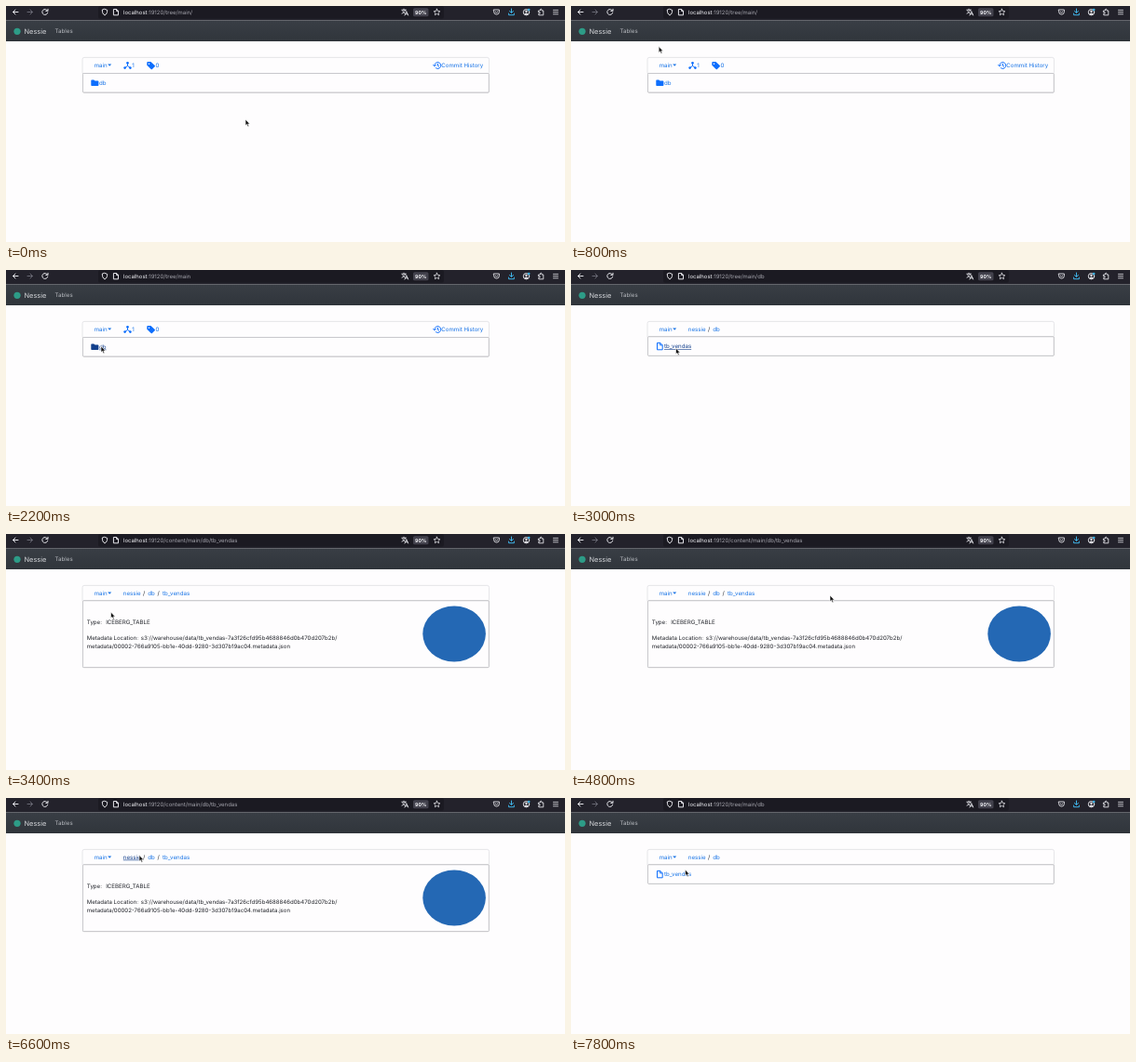
These frames come from a looping animation (600x254 px, 8 s). An HTML page:

```html
<!DOCTYPE html>
<html lang="en">
<head>
<meta charset="utf-8">
<style>
  html, body { margin: 0; width: 100%; height: 100%; overflow: hidden; background: #fefdfe; }
  svg { display: block; width: 600px; height: 254px; }
  text { font: 6.17px Inter, sans-serif; fill: #202329; text-rendering: geometricPrecision; white-space: pre; }
  .location { font-size: 6.08px; }
  .link { fill: #1673e6; }
  .hover { fill: #123f8c; text-decoration: underline; }
  .folder { fill: #0d6efd; }
  .folder.hover { fill: #123f8c; }
  .line { fill: none; stroke: #e4e4e9; stroke-width: 1; stroke-linecap: round; stroke-linejoin: round; }
  .dim { stroke: #696974; }
  .blue { stroke: #3fb4e8; }
  .icon { fill: none; stroke: #0d6efd; stroke-width: 1; }
  .box { fill: #fefdfe; stroke: #e0e0e4; stroke-width: .8; }
  .panel { fill: #fefdfe; stroke: #c8c8cc; stroke-width: 1; filter: drop-shadow(0 .4px .6px #0004); }
</style>
</head>
<body>
<svg viewBox="0 0 600 254">
  <defs>
    <linearGradient id="dark" x2="0" y2="1">
      <stop stop-color="#393e45"/><stop offset="1" stop-color="#30353b"/>
    </linearGradient>
  </defs>
  <rect width="600" height="254" fill="#fefdfe"/>

  <g id="browser">
    <rect width="600" height="15.5" fill="#23222b"/>
    <rect x="99" y="0" width="371" height="13.5" rx="2" fill="#1b1a22"/>
    <path class="line" d="M13 6.5H7.5M10 4L7.5 6.5L10 9"/>
    <path class="line dim" d="M23 6.5h5.5M26 4l2.5 2.5L26 9"/>
    <path id="reload" class="line" d="M44.5 5A3 3 0 1 0 44.8 7.2M45 3.3V5.4H42.8"/>
    <path id="stop" class="line" d="M39.7 4.3l4.6 4.6m0-4.6l-4.6 4.6"/>
    <path class="line" d="M106 3.4l2.7 1c0 3-.8 4.5-2.7 5.6c-1.9-1.1-2.7-2.6-2.7-5.6z"/>
    <path class="line" d="M115.8 3.5h3l1.7 1.8v4.5h-4.7zM118.6 3.7v1.8h1.8"/>
    <text x="126" y="9" style="font-size:5.98px;fill:#a5a5ad"><tspan fill="#f6f6fa">localhost</tspan><tspan id="path"></tspan></text>
    <path id="translate" class="line" style="stroke-width:.9" d="M424.8 4.2h4.6M427 3.2v1M428.6 4.3c-.5 1.8-1.7 3-3.6 3.8M425.7 5.2c.5 1.2 1.2 2 2.2 2.6M428 10l1.8-4.3L431.6 10M428.7 8.7h2.3"/>
    <rect x="437" y="2.3" width="16.5" height="9" rx="1.6" fill="#43424d"/>
    <text x="445.3" y="8.8" text-anchor="middle" style="font-size:5.3px;font-weight:700;fill:#f8f8fb">90%</text>
    <path class="line" d="M462.5 3.2l1 2.2 2.4.3-1.8 1.6.5 2.4-2.1-1.2-2.1 1.2.5-2.4-1.8-1.6 2.4-.3z" style="stroke-width:.8"/>
    <path class="line" d="M523.6 4h5.8v2.2a2.9 2.9 0 0 1-5.8 0zM525.1 5.9l1.4 1.3 1.4-1.3" style="stroke-width:.9"/>
    <path class="line blue" d="M542.5 3v4.2m-2-1.8l2 2 2-2M539.6 8v1.7h5.8V8"/>
    <circle class="line" cx="558.5" cy="6.7" r="3.2"/>
    <circle cx="558.5" cy="5.8" r="1.2" fill="#e4e4e9"/>
    <path d="M556.4 8.7q2.1-2.4 4.2 0l-2.1 1z" fill="#e4e4e9"/>
    <circle cx="561.2" cy="4" r="1.3" fill="#3fb4e8"/>
    <path class="line" d="M571.8 5h1.6q-.4-1.8.8-1.8T575 5h1.8v4.8h-5V8q1.6.2 1.6-.7t-1.6-.7z" style="stroke-width:.9"/>
    <path class="line" d="M587.5 4.4h5m-5 2.2h5m-5 2.2h5" style="stroke-width:.8"/>
  </g>

  <g id="page">
    <rect y="15.5" width="600" height="22.5" fill="url(#dark)"/>
    <circle cx="12" cy="27.3" r="3.6" fill="#2d9c87"/>
    <text x="19.5" y="29.7" style="font-size:7.4px;fill:#d4d6d9">Nessie</text>
    <text id="tables" x="52.6" y="29.2">Tables</text>
    <rect class="box" x="82" y="55.4" width="436.5" height="18" rx="2"/>
    <text class="link" x="94.7" y="65.6">main</text>
    <path d="M109.2 62.6h4l-2 2.1z" fill="#1673e6"/>

    <g id="tree">
      <path class="icon" d="M130.5 61.5v3l-2.8 2m2.8-2l2.8 2"/>
      <g class="folder">
        <circle cx="130.5" cy="61.3" r="1.3"/><circle cx="127.6" cy="66.6" r="1.3"/><circle cx="133.4" cy="66.6" r="1.3"/>
        <path fill-rule="evenodd" d="M151.3 60.8q0-.9.9-.9h3.2l4.3 4.2q.6.6 0 1.2l-2.8 2.7q-.6.6-1.2 0l-4.4-4.2zM153.5 61.4a.7.7 0 1 0 .01 0z"/>
      </g>
      <text class="link" x="135.3" y="65.6">1</text>
      <text class="link" x="160.4" y="65.6">0</text>
      <path class="icon" d="M460 64a3.4 3.4 0 1 1 1.1 2.5M458.4 63.4l1.6 1.5 1.5-1.5M463.4 62v2.2l1.6 1"/>
      <text class="link" x="467.2" y="65.6">Commit History</text>
      <rect class="panel" x="82.5" y="72.5" width="435.8" height="20.5" rx="1"/>
      <path id="folder" class="folder" d="M91.3 80.2q0-.8.8-.8h2.3l1 1h3.2q.8 0 .8.8v4.1q0 .8-.8.8h-6.5q-.8 0-.8-.8z"/>
      <text id="dbItem" class="link" x="100" y="84.6">db</text>
    </g>

    <g id="crumbs">
      <text id="nessie" class="link" x="125.8" y="65.6">nessie</text>
      <text x="147" y="65.6">/</text>
      <text id="dbCrumb" class="link" x="152.2" y="65.6">db</text>
    </g>

    <g id="db">
      <rect class="panel" x="82.5" y="71.8" width="435.8" height="20.5" rx="1"/>
      <path class="icon" d="M92.5 78.4h3.4l2.3 2.4v5h-5.7zM95.7 78.6v2.3h2.3"/>
      <text id="tableItem" class="link" x="100" y="84.3">tb_vendas</text>
    </g>

    <g id="content">
      <text x="162.6" y="65.6">/</text>
      <text class="link" x="168" y="65.6">tb_vendas</text>
      <rect class="panel" x="82.5" y="71.8" width="435.8" height="71.8" rx="1"/>
      <text x="86.8" y="96.7">Type:</text>
      <text x="107.2" y="96.7">ICEBERG_TABLE</text>
      <text class="location" x="86.8" y="113.8">Metadata Location:</text>
      <text class="location" x="144.8" y="113.8">s3://warehouse/data/tb_vendas-7a3f26cfd95b4688846d0b470d207b2b/</text>
      <text class="location" x="86.8" y="122.9">metadata/00002-766a9105-bb1e-40dd-9280-3d307b19ac04.metadata.json</text>
      <ellipse cx="481.1" cy="107.5" rx="33.8" ry="30" fill="#2468b4"/>
    </g>
  </g>

  <g id="cursor" stroke="#fff" stroke-width=".6" stroke-linejoin="round">
    <path id="arrow" fill="#111" d="M0 0v6.6l1.5-1.3 1 2.4 1.2-.5-1-2.3h2z"/>
    <path id="hand" fill="#fff" stroke="#222" stroke-width=".8" d="M-1 .5q.7-.9 1.3 0v2.3l2.8.7q.8.3.7 1.1l-.6 2.9h-3.4l-2-2.6q-.4-.9.5-.9l.7.5z"/>
  </g>
</svg>
<script>
const LOOP = 8000, STEP = 200;
const $ = id => document.getElementById(id);

// [start, view, path shown after the host]
const visits = [
  [0, 'tree', ':19120/tree/main/'],
  [1200, 'blank', ':19120'],
  [1400, 'tree', ':19120/tree/main'],
  [2400, 'db', ':19120/tree/main/db'],
  [3200, 'content', ':19120/content/main/db/tb_vendas'],
  [7200, 'db', ':19120/tree/main/db']
];

// [time, x, y] of the pointer tip
const track = [
  [200, 257, 122], [1000, 64, 29], [1600, 64, 29], [2200, 102, 82], [2600, 102, 82],
  [3000, 112.5, 84], [4000, 112.5, 84], [4800, 278, 66], [5200, 278, 66],
  [6400, 143, 61.5], [6600, 143, 61.5], [7000, 155, 62], [7200, 155, 62], [7800, 122.5, 77], [8000, 122.5, 77]
];

// [element, from, to]
const hovers = [
  ['folder', 2200, 2400], ['dbItem', 2200, 2400], ['tableItem', 2800, 3200],
  ['nessie', 6400, 6800], ['dbCrumb', 7000, 7200]
];

function pointerAt(t) {
  const next = track.findIndex(k => k[0] > t);
  if (next === 0) return track[0].slice(1);
  const [t0, x0, y0] = track[next - 1], [t1, x1, y1] = track[next];
  const u = (t - t0) / (t1 - t0), ease = u * u * (3 - 2 * u);
  return [x0 + (x1 - x0) * ease, y0 + (y1 - y0) * ease];
}

const show = (id, on) => $(id).style.display = on ? '' : 'none';

function draw(now) {
  const t = Math.floor((now % LOOP) / STEP) * STEP;
  const [, view, path] = visits.findLast(v => v[0] <= t);
  const loading = view === 'blank';
  $('path').textContent = path;
  show('page', !loading);
  show('translate', !loading);
  show('reload', !loading);
  show('stop', loading);
  for (const id of ['tree', 'db', 'content']) show(id, view === id);
  show('crumbs', view === 'db' || view === 'content');

  for (const [id, from, to] of hovers) $(id).classList.toggle('hover', t >= from && t < to);

  const overTables = t >= 1000 && t < 1600;
  $('tables').style.fill = overTables ? '#d0d3d6' : '#b6b9be';
  show('hand', overTables);
  show('arrow', !overTables);
  $('cursor').setAttribute('transform', `translate(${pointerAt(t)})`);
  requestAnimationFrame(() => draw(performance.now() - start));
}

const start = performance.now();
draw(0);
</script>
</body>
</html>
```
